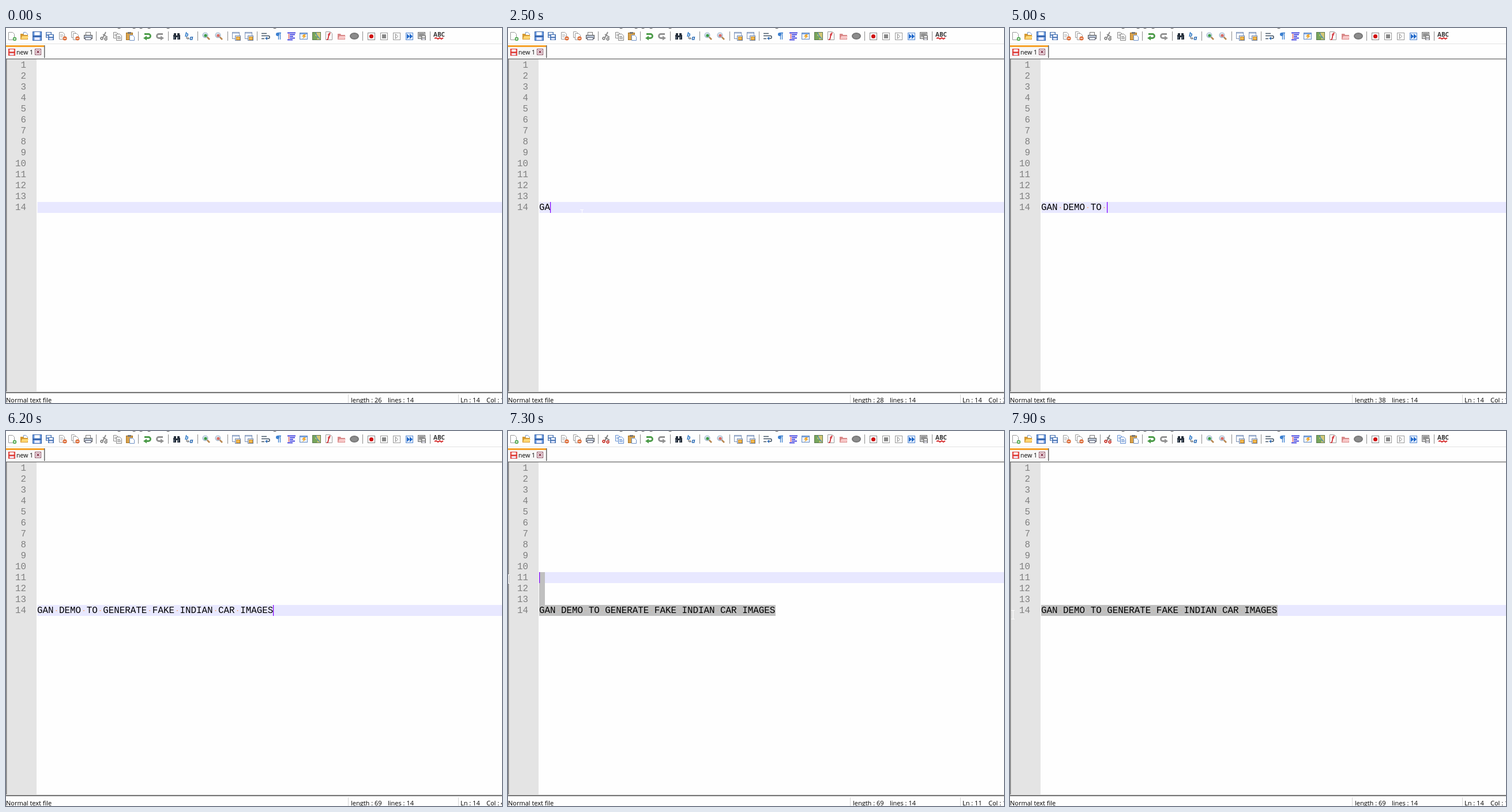
Animation, 860 px wide and 651 px high, one loop 8000 ms. Source, as an HTML page with a canvas:

```html
<!DOCTYPE html>
<html lang="en">
<head>
<meta charset="utf-8">
<title>Editor typing</title>
<style>
html, body { margin: 0; width: 100%; height: 100%; overflow: hidden; background: #fefefe; }
canvas { display: block; }
</style>
</head>
<body>
<canvas id="stage" width="860" height="651"></canvas>
<script>
const g = document.getElementById('stage').getContext('2d');
const LOOP = 8000, CHAR = 9.522, LEFT = 54, ROW = 19;
const MESSAGE = 'GAN DEMO TO GENERATE FAKE INDIAN CAR IMAGES';
const MONO = '15.87px "Liberation Mono", "Courier New", monospace';
const UI = '"Open Sans", "Noto Sans", sans-serif';

// Step tracks: [start time, value...]
const typed = [[0, 0], [2100, 1], [2500, 2], [2700, 3], [2900, 4], [3100, 5], [3300, 6],
  [3500, 7], [3700, 8], [4000, 9], [4300, 10], [4500, 11], [5000, 12], [5500, 43]];
const caretOn = [[0, 0], [600, 1], [1100, 0], [1700, 1], [3700, 0], [4000, 1],
  [5600, 0], [6200, 1], [6800, 0], [6900, 1], [7900, 0]];
const pointer = [[0, -20, 0], [900, 128, 315], [2900, -20, 0], [6500, 128, 315], [6800, 463, 303],
  [7000, 349, 302], [7100, 263, 298], [7200, 235, 268], [7300, 0, 249],
  [7600, 1, 268], [7700, 3, 288], [7800, 4, 304], [7900, 5, 311]];
const selection = [[0, 14, 43], [7000, 14, 31], [7100, 14, 22], [7200, 13, 0], [7300, 11, 0],
  [7600, 12, 0], [7700, 13, 0], [7800, 14, 0]];

const at = (track, t) => track.findLast(step => step[0] <= t).slice(1);
const rowTop = n => 55 + ROW * (n - 1);

function box(color, x, y, w, h) {
  g.fillStyle = color;
  g.fillRect(x, y, w, h);
}
function frame(color, x, y, w, h, fill = '#fff') {
  box(fill, x, y, w, h);
  g.strokeStyle = color;
  g.lineWidth = 1;
  g.strokeRect(x + .5, y + .5, w - 1, h - 1);
}
function dot(color, x, y, r, ry = r) {
  g.fillStyle = color;
  g.beginPath();
  g.ellipse(x, y, r, ry, 0, 0, 7);
  g.fill();
}
function path(color, d, width = 0) {
  const p = new Path2D(d);
  g.fillStyle = g.strokeStyle = color;
  g.lineWidth = width;
  width ? g.stroke(p) : g.fill(p);
}
function text(s, x, y, font, color = '#000', align = 'left') {
  g.font = font;
  g.fillStyle = color;
  g.textAlign = align;
  g.fillText(s, x, y);
}
function icon(x, draw) {
  g.save();
  g.translate(x - 8, 6);
  draw();
  g.restore();
}

function floppy(x, y, s, color, light) {
  frame(color, x, y, s, s, light);
  box('#fff', x + s * .22, y + 1, s * .56, s * .35);
  box(color, x + 1, y + s * .45, s - 2, s * .15);
  box('#eef', x + s * .22, y + s * .65, s * .56, s * .28);
}
function sheet(x, y, w, h, color = '#9a9a9a') {
  path('#fff', `M${x} ${y}h${w - 3}l3 3v${h - 3}h${-w}z`);
  path(color, `M${x + .5} ${y + .5}h${w - 4}l3 3v${h - 4}h${1 - w}z`, 1);
}
function badge(color) {
  dot(color, 12, 12, 3.6);
  box('#fff', 10, 11.5, 4, 1.2);
}
function folder(color, edge) {
  path(edge, 'M1 4h5l1 2h7v8H1z');
  path(color, 'M2 13l2-5h11l-2 5z');
}
function copies(color) {
  sheet(1, 1, 9, 11, color);
  path(color, 'M3 5h4M3 7.5h4', 1);
  sheet(6, 4, 10, 12, color);
  path(color, 'M8 8.5h5M8 10.5h6M8 12.5h6', 1);
}
function scissors(blade, handle) {
  path(blade, 'M10 1L5 11M5 5l8 5', 1.8);
  path(handle, 'M3 10a2 2 0 1 0 .1 0M10 11a2 2 0 1 0 .1 0', 1.8);
}
function arrow(color, flip) {
  if (flip) { g.translate(16, 0); g.scale(-1, 1); }
  path(color, 'M3 4.5h7a3.3 3.3 0 0 1 0 7H6', 2.8);
  path(color, 'M7 7.5v8L1 11.5z');
}
function lens(color) {
  path('#b9874f', 'M9 9l5 5', 2.6);
  dot('#a9bdd0', 6.5, 6.5, 5);
  dot('#dbe8f2', 6.5, 6, 3.5);
  dot(color, 7, 7, 2.6);
}
function syncPanes() {
  frame('#7f93b5', 1, 1, 13, 12, '#fff');
  box('#b7c8e3', 2, 2, 11, 2);
  frame('#6f86ac', 6, 7, 10, 9, '#e5ecf7');
  frame('#c98b28', 8, 9, 7, 6, '#f3b94e');
}

function toolbar(active) {
  for (const x of [156, 229, 281, 332, 384, 435, 618, 735]) box('#8b8b8b', x, 6, 1, 16);
  icon(11, () => { sheet(1, 1, 11, 14); dot('#47a447', 12, 13, 3.2); box('#fff', 10, 12.5, 4, 1); box('#fff', 11.5, 11, 1, 4); });
  icon(32, () => { sheet(6, 1, 8, 9, '#7495c8'); folder('#ffd774', '#d59a32'); });
  icon(54, () => floppy(0, 0, 16, '#315fa8', '#6d9ce0'));
  icon(76, () => { floppy(1, 1, 10, '#5277ae', '#9fc0ed'); floppy(5, 5, 10, '#416ba9', '#7fa8e2'); });
  icon(98, () => { sheet(2, 1, 10, 13); path('#bbb', 'M4 5.5h5M4 7.5h6M4 9.5h4', 1); badge('#dc6a35'); });
  icon(120, () => { sheet(1, 0, 9, 11); sheet(4, 3, 10, 12); badge('#dc6a35'); });
  icon(142, () => {
    frame('#777', 4, 1, 9, 7);
    frame('#555', 1, 6, 15, 7, '#b8c4d4');
    frame('#667', 3, 10, 11, 5, '#e9f2fc');
  });
  icon(171, () => active ? scissors('#777', '#c9382f') : scissors('#888', '#858585'));
  icon(193, () => copies(active ? '#5d8bd0' : '#858585'));
  icon(215, () => {
    frame('#a77220', 1, 2, 12, 13, '#d9a24c');
    box('#777', 4, 1, 6, 3);
    sheet(7, 6, 9, 10, '#6d8fc5');
  });
  icon(245, () => arrow('#4b9b48'));
  icon(267, () => arrow('#929292', true));
  icon(296, () => {
    box('#28313d', 3, 3, 4, 4); box('#28313d', 9, 3, 4, 4);
    box('#28313d', 2, 6, 5, 8); box('#28313d', 9, 6, 5, 8); box('#28313d', 6, 7, 4, 3);
    box('#8494a8', 3, 9, 1, 4); box('#8494a8', 10, 9, 1, 4);
  });
  icon(318, () => {
    text('b', 0, 9, `italic bold 11px ${UI}`, '#2c78c7');
    text('a', 8, 15, `italic bold 11px ${UI}`, '#2467b3');
    path('#555', 'M3 9v3h4M5 10l2 2-2 2', 1);
  });
  icon(347, () => lens('#3c9b45'));
  icon(369, () => lens('#d96b63'));
  icon(399, syncPanes);
  icon(421, syncPanes);
  icon(450, () => { path('#456', 'M1 3.5h9M1 7.5h12q2 0 2 2.5t-2 2H9M1 12.5h5', 1.6); path('#3774bd', 'M11 9v6l-4-3z'); });
  icon(472, () => { path('#3b7fd0', 'M8 2.5h5M8.5 2v12M11.5 2v12', 1.3); dot('#3b7fd0', 7, 5, 3); });
  icon(495, () => { path('#1717d8', 'M1 2.5h14M5 5.5h9M5 8.5h6M5 11.5h9M1 14.5h9', 1.7); path('#d33', 'M3.5 4v9', 1); });
  icon(516, () => { frame('#638ac2', 1, 2, 14, 12, '#edf4ff'); box('#7fa7df', 2, 3, 12, 2); path('#f2a82b', 'M8 5h4l-2 3h3l-7 5 2-4H5z'); });
  icon(538, () => {
    frame('#5a7850', 1, 1, 15, 14, '#d4c878');
    path('#77a65b', 'M2 2h6l-2 5 5 3-2 4H2z');
    path('#4b8fb0', 'M7 2l2 5 5 6', 1.5);
  });
  icon(560, () => { sheet(2, 0, 12, 15); text('f', 5, 12, `italic bold 13px ${UI}`, '#cf2f35'); });
  icon(582, () => folder('#f8c8c8', '#d88888'));
  icon(604, () => { dot('#777', 8, 8, 8, 6); dot('#8c8c8c', 8, 8, 6, 4); });
  icon(633, () => { frame('#888', 2, 2, 13, 13); dot('#cf1111', 8.5, 8.5, 3.6); });
  icon(655, () => { frame('#999', 2, 2, 13, 13); box('#888', 5, 5, 7, 7); });
  icon(677, () => { frame('#999', 2, 2, 13, 13); path('#888', 'M6.5 4.5l4 4-4 4z', 1); });
  icon(699, () => { frame('#5a8bd0', 2, 2, 13, 13, '#e4efff'); path('#1c65c8', 'M4 4l5 4.5L4 13zM9 4l5 4.5L9 13z'); });
  icon(721, () => { frame('#777', 1, 1, 13, 12, '#ccc'); path('#777', 'M3 4.5h9M3 7.5h9', 2); floppy(7, 7, 8, '#777', '#aaa'); });
  text('ABC', 751, 15, `bold 10px ${UI}`, '#333', 'center');
  path('#d52b2b', 'M743 18l3-1 3 2 3-2 3 2 3-2', 2);
}

function chrome(active) {
  box('#fefefe', 0, 0, 860, 651);
  for (const x of [193, 219, 231, 245, 278, 463]) text('g', x, -2, `12px ${UI}`, '#333');
  toolbar(active);
  box('#e2e2e2', 0, 27, 860, 1);
  box('#f7f7f7', 0, 30, 66, 22);
  box('#f6a128', 0, 30, 66, 3);
  box('#666', 66, 30, 1.5, 22);
  floppy(4, 36, 12, '#d8302c', '#ef7770');
  text('new 1', 18, 46, `10.5px ${UI}`);
  frame('#8b5161', 50, 36, 11, 11, '#f5e7eb');
  path('#8b3f55', 'M53 39l5 5M58 39l-5 5', 1.6);

  box('#e4e4e4', 2, 54, 51, 577);
  box('#777', 0, 53, 860, 1.4);
  box('#777', 0, 53, 1.5, 579);
  for (let n = 1; n <= 14; n++) text(n, 35, rowTop(n) + 14, MONO, '#808080', 'right');
  box('#e4e4e4', 0, 631, 860, 1);
  box('#747474', 0, 632, 860, 2);
  box('#d5d5d5', 593, 636, 1, 15);
  box('#d5d5d5', 784, 636, 1, 15);
}

function draw(t) {
  const [count] = at(typed, t), [row, start] = at(selection, t);
  const selecting = t >= 7000;
  const column = selecting ? start : count;
  chrome(selecting);

  box('#e8e8ff', LEFT + .5, rowTop(row), 806, ROW);
  if (selecting) {
    for (let n = row; n < 14; n++) box('#c0c0c0', LEFT, rowTop(n), 10, ROW);
    box('#c0c0c0', LEFT + start * CHAR, rowTop(14), (MESSAGE.length - start) * CHAR + .5, ROW);
  }
  [...MESSAGE.slice(0, count)].forEach((c, i) => {
    if (c === ' ') box(selecting && i >= start ? '#c8b49c' : '#ff9a4a', LEFT + i * CHAR + 4, 311, 1.5, 1.5);
  });
  text(MESSAGE.slice(0, count), LEFT, rowTop(14) + 14, MONO);
  if (at(caretOn, t)[0]) box('#8000ff', Math.floor(LEFT + column * CHAR), rowTop(row), 1.2, ROW);

  const [x, y] = at(pointer, t);
  path('#fff', `M${x - 3} ${y + .5}h6M${x + .5} ${y}v16M${x - 3} ${y + 15.5}h6`, 1);

  const ui = `11px ${UI}`;
  text('Normal text file', 0, 650, ui);
  text(`length : ${26 + count}`, 598, 650, ui);
  text('lines : 14', 662, 650, ui);
  text(`Ln : ${row}`, 788, 650, ui);
  text('Col :', 833, 650, ui);
  text(column + 1, 858, 650, ui);
}

function tick() {
  draw(performance.now() % LOOP);
  requestAnimationFrame(tick);
}
tick();
</script>
</body>
</html>
```
